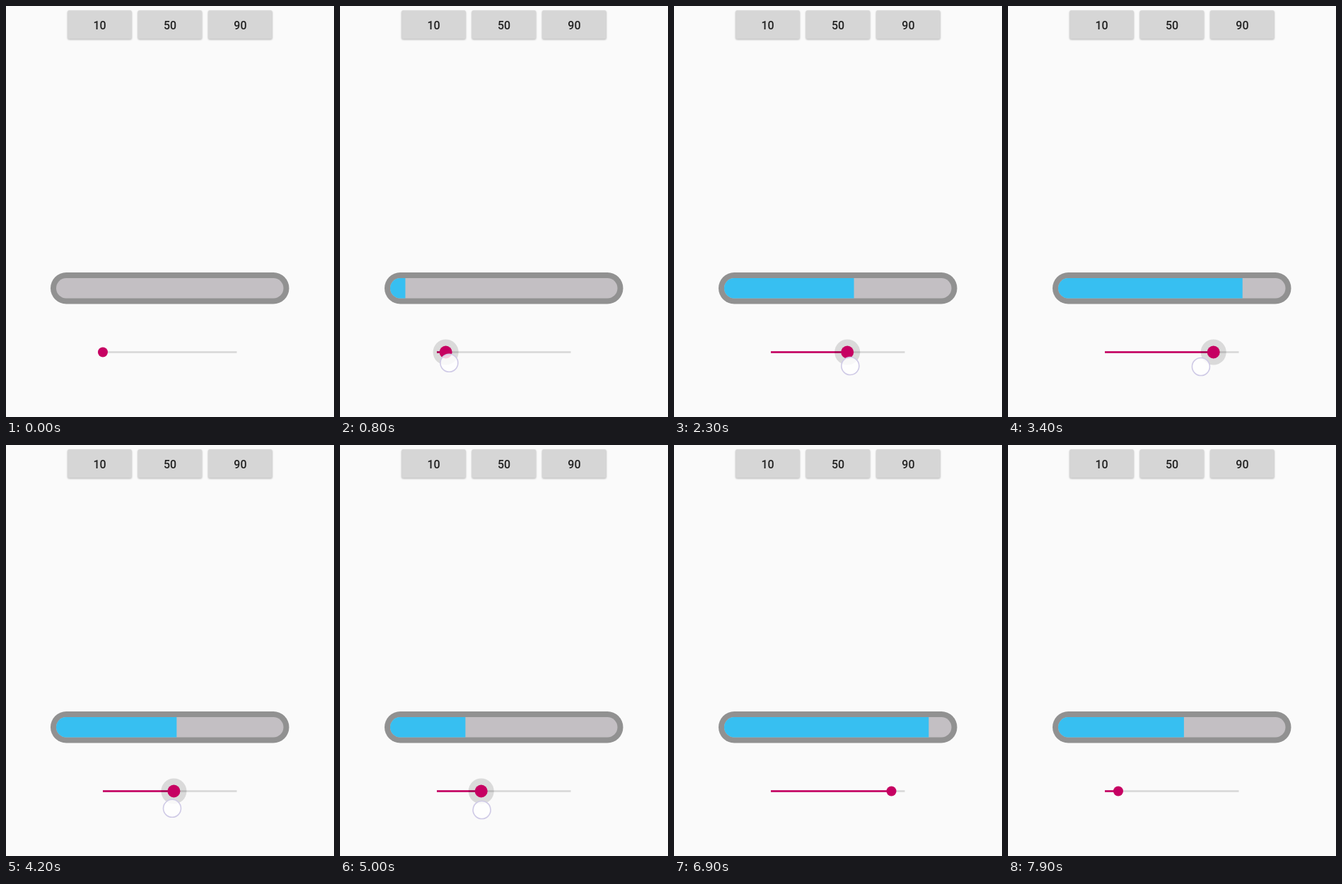
An HTML page for the animation above (8 s loop, 464 px wide and 580 px high).

```html
<!DOCTYPE html>
<html lang="en">
<head>
<meta charset="utf-8">
<title>Progress bar and slider</title>
<style>
  html, body { margin: 0; width: 100%; height: 100%; overflow: hidden; background: #fafafa; }
  svg { display: block; width: 100vw; height: 100vh; }
  text { font: 500 16px Roboto, sans-serif; fill: #212121; text-anchor: middle; }
</style>
</head>
<body>
<svg viewBox="0 0 464 580">
  <defs>
    <clipPath id="inner"><rect x="71" y="384" width="321.5" height="28.5" rx="14.25"/></clipPath>
    <filter id="soft" x="-10%" y="-20%" width="120%" height="140%"><feGaussianBlur stdDeviation="1.1"/></filter>
  </defs>
  <g id="buttons"></g>
  <rect x="63" y="376" width="337.5" height="44.5" rx="22.25" fill="#919191"/>
  <g clip-path="url(#inner)">
    <rect x="71" y="384" width="322" height="29" fill="#c3bfc3"/>
    <rect id="fill" x="71" y="384" height="29" fill="#37bff1"/>
  </g>
  <rect x="137" y="487.2" width="189.5" height="2.6" fill="#d8d8d8"/>
  <rect id="track" x="137" y="487.2" height="2.6" fill="#c60062"/>
  <circle id="halo" cy="488.5" r="18" fill="#000"/>
  <circle id="thumb" cy="488.5" fill="#c60062"/>
  <circle id="touch" r="12.5" fill="#fff" fill-opacity=".8" stroke="#cfcae6" stroke-width="1.6"/>
</svg>
<script>
const LOOP = 8000, STEP = 100, FILL_TIME = 1200, LAG = 60;
const DRAG = { start: 500, end: 5200 };
const TAPS = [
  { button: 2, down: 5480, up: 5695, x: 331, y: 28, from: 0.33, to: 0.9 },
  { button: 0, down: 7170, up: 7380, x: 132, y: 32, from: 0.9, to: 0.1 }
];
// [time, value] of the dragged slider
const VALUES = [[600, 0], [900, 0.1], [1500, 0.341], [2100, 0.53], [2300, 0.571], [3000, 0.763],
  [3200, 0.865], [3270, 0.872], [3400, 0.811], [3460, 0.712], [3600, 0.67], [3900, 0.62],
  [4300, 0.5], [4800, 0.352], [5000, 0.331], [5100, 0.33]];
// [time, y] of the finger while dragging
const FINGER_Y = [[500, 503], [1500, 505.5], [2300, 508], [3400, 509], [3900, 512], [5000, 515], [5200, 518]];

const $ = id => document.getElementById(id);
const clamp = x => Math.min(1, Math.max(0, x));
const ramp = (t, start, length) => clamp((t - start) / length);
const set = (el, attrs) => { for (const k in attrs) el.setAttribute(k, attrs[k]); };

function along(points, t) {
  const i = points.findIndex(p => p[0] > t);
  if (i === 0) return points[0][1];
  if (i < 0) return points[points.length - 1][1];
  const [t0, a] = points[i - 1], [t1, b] = points[i];
  return a + (b - a) * (t - t0) / (t1 - t0);
}

$('buttons').innerHTML = [10, 50, 90].map((label, i) => {
  const x = 87.2 + i * 99.4;
  const box = `x="${x}" width="90.6" height="40.3" rx="2"`;
  return `<rect class="shadow" ${box} y="7.2" filter="url(#soft)"/>
    <rect class="face" ${box} y="6.2"/>
    <text x="${x + 45.4}" y="33">${label}</text>`;
}).join('');
const shadows = document.querySelectorAll('.shadow');
const faces = document.querySelectorAll('.face');

const pressure = (tap, t) => Math.min(ramp(t, tap.down, 100), 1 - ramp(t, tap.up, 400));

function draw(t) {
  let slider = along(VALUES, t), bar = slider;
  const dragging = t >= DRAG.start && t < DRAG.end;
  let finger = dragging && { x: 137 + 189.5 * along(VALUES, t + LAG) + 1, y: along(FINGER_Y, t) };
  const press = [0, 0, 0];

  for (const tap of TAPS) {
    press[tap.button] = pressure(tap, t);
    if (t >= tap.down && t < tap.up) finger = tap;
    if (t >= tap.up) {
      slider = tap.to;
      bar = tap.from + (tap.to - tap.from) * ramp(t, tap.up, FILL_TIME);
    }
  }

  press.forEach((p, i) => {
    const grey = 214 - 15 * p;
    set(faces[i], { fill: `rgb(${grey},${grey},${grey})` });
    set(shadows[i], { 'fill-opacity': 0.28 + 0.12 * p });
  });

  const grip = Math.min(ramp(t, DRAG.start - 50, 150), 1 - ramp(t, DRAG.end, 150));
  const cx = 137 + 189.5 * slider;
  set($('fill'), { width: 321.5 * bar });
  set($('track'), { width: 189.5 * slider });
  set($('halo'), { cx, 'fill-opacity': 0.13 * grip });
  set($('thumb'), { cx, r: 7 + 2 * grip });
  set($('touch'), { visibility: finger ? 'visible' : 'hidden' });
  if (finger) set($('touch'), { cx: finger.x, cy: finger.y });
}

function tick() {
  draw(Math.floor(performance.now() % LOOP / STEP) * STEP);
  requestAnimationFrame(tick);
}
tick();
</script>
</body>
</html>
```
